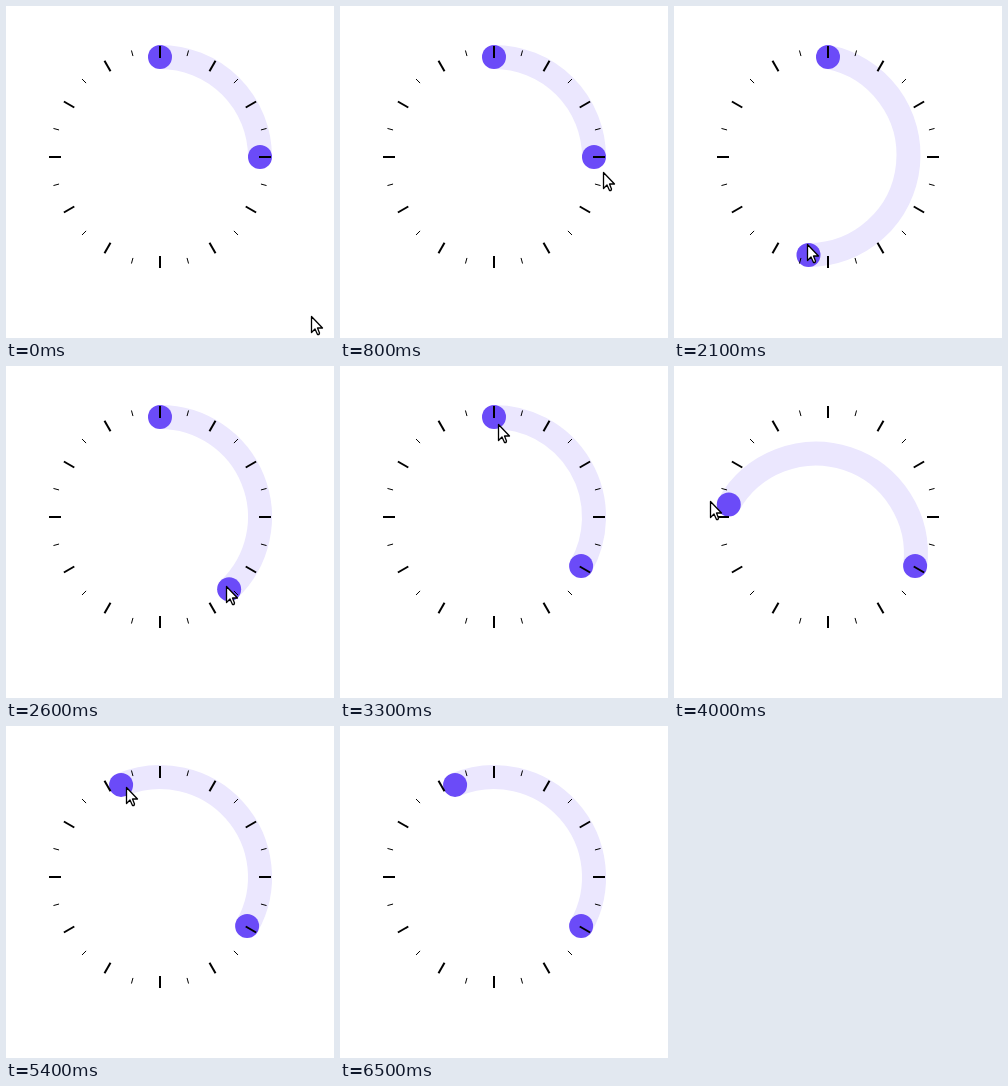
Animation of 328 by 332 pixels, one loop 7100 ms. Source, as an HTML page:

```html
<!DOCTYPE html>
<html lang="en">
<head>
<meta charset="utf-8">
<title>Circular range slider</title>
<style>
html, body { margin: 0; width: 100%; height: 100%; overflow: hidden; background: #fff; }
svg { display: block; }
</style>
</head>
<body>
<svg width="328" height="332" viewBox="0 0 328 332">
  <path id="band" fill="none" stroke="#ebe7fe" stroke-width="24"/>
  <g fill="#6b4bf8">
    <circle id="start" r="12"/>
    <circle id="end" r="12"/>
  </g>
  <g id="ticks" stroke="#000"></g>
  <path id="cursor" d="M.5 .5V16.5L4 13L6.5 18.5H8L8.5 17L6.5 12H11.5Z" fill="#fff" stroke="#000" stroke-width="1.3" stroke-linejoin="round"/>
</svg>
<script>
const LOOP = 7100, STEP = 100, EXIT = 6500;
const CX = 154, CY = 151, R = 100;
const LAG = 0.2, GRIP = 2.2; // knobs trail the pointer in time and in degrees
const el = id => document.getElementById(id);

// Turning points of the pointer around the dial centre.
// t is in steps; bow bends the path leading to the point inwards.
const path = [
  { t: 1, deg: 136.5, r: 219, bow: 0 },
  { t: 8, deg: 98, r: 110, bow: 0 },
  { t: 12.2, deg: 92.2, r: 100.7, bow: 0 },    // grab end knob
  { t: 21, deg: 193.6, r: 89.5, bow: 0 },
  { t: 28, deg: 121.6, r: 97, bow: 0 },        // drop it
  { t: 33, deg: 2.2, r: 93, bow: 42 },         // grab start knob
  { t: 41, deg: -86, r: 120, bow: 0 },
  { t: 49, deg: 92, r: 106, bow: 44 },
  { t: 53.8, deg: -20.7, r: 96, bow: 0 },      // drop it
  { t: 57, deg: -20.7, r: 96, bow: 0 },
  { t: 64, deg: 156.8, r: 177, bow: 60 }
];

const clamp = (x, lo, hi) => Math.min(hi, Math.max(lo, x));

function pointer(t) {
  t = clamp(t, path[0].t, path.at(-1).t);
  const i = Math.max(1, path.findIndex(k => k.t >= t));
  const p = path[i - 1], q = path[i];
  const u = (t - p.t) / (q.t - p.t), s = u * u * (3 - 2 * u);
  return {
    deg: p.deg + (q.deg - p.deg) * s,
    r: p.r + (q.r - p.r) * s - q.bow * 4 * s * (1 - s)
  };
}

function point(deg, r) {
  const a = deg * Math.PI / 180;
  return [CX + r * Math.sin(a), CY - r * Math.cos(a)];
}

// A knob follows the pointer only between grab and drop.
const knob = (t, grab, drop) => point(pointer(clamp(t - LAG, grab.t, drop.t)).deg - GRIP, R);

function setAttrs(node, attrs) {
  for (const name in attrs) node.setAttribute(name, attrs[name]);
}

for (let i = 0; i < 24; i++) {
  const small = i % 2;
  const line = document.createElementNS("http://www.w3.org/2000/svg", "line");
  const [x1, y1] = point(i * 15, small ? 104.5 : 99);
  const [x2, y2] = point(i * 15, small ? 110.3 : 111);
  setAttrs(line, { x1, y1, x2, y2, "stroke-width": small ? 1 : 2 });
  el("ticks").append(line);
}

function draw(now) {
  const ms = now % LOOP, t = Math.floor(ms / STEP);
  const a = knob(t, path[5], path[8]), b = knob(t, path[2], path[4]);
  setAttrs(el("start"), { cx: a[0], cy: a[1] });
  setAttrs(el("end"), { cx: b[0], cy: b[1] });
  // Always the short arc, so the band shifts sideways past a half turn.
  setAttrs(el("band"), { d: `M${a} A${R} ${R} 0 0 1 ${b}` });
  const { deg, r } = pointer(t);
  setAttrs(el("cursor"), {
    transform: `translate(${point(deg, r).map(Math.round)})`,
    visibility: ms < EXIT ? "visible" : "hidden"
  });
}

let origin;
function tick(now) {
  origin ??= now;
  draw(now - origin);
  requestAnimationFrame(tick);
}
draw(0);
requestAnimationFrame(tick);
</script>
</body>
</html>
```
